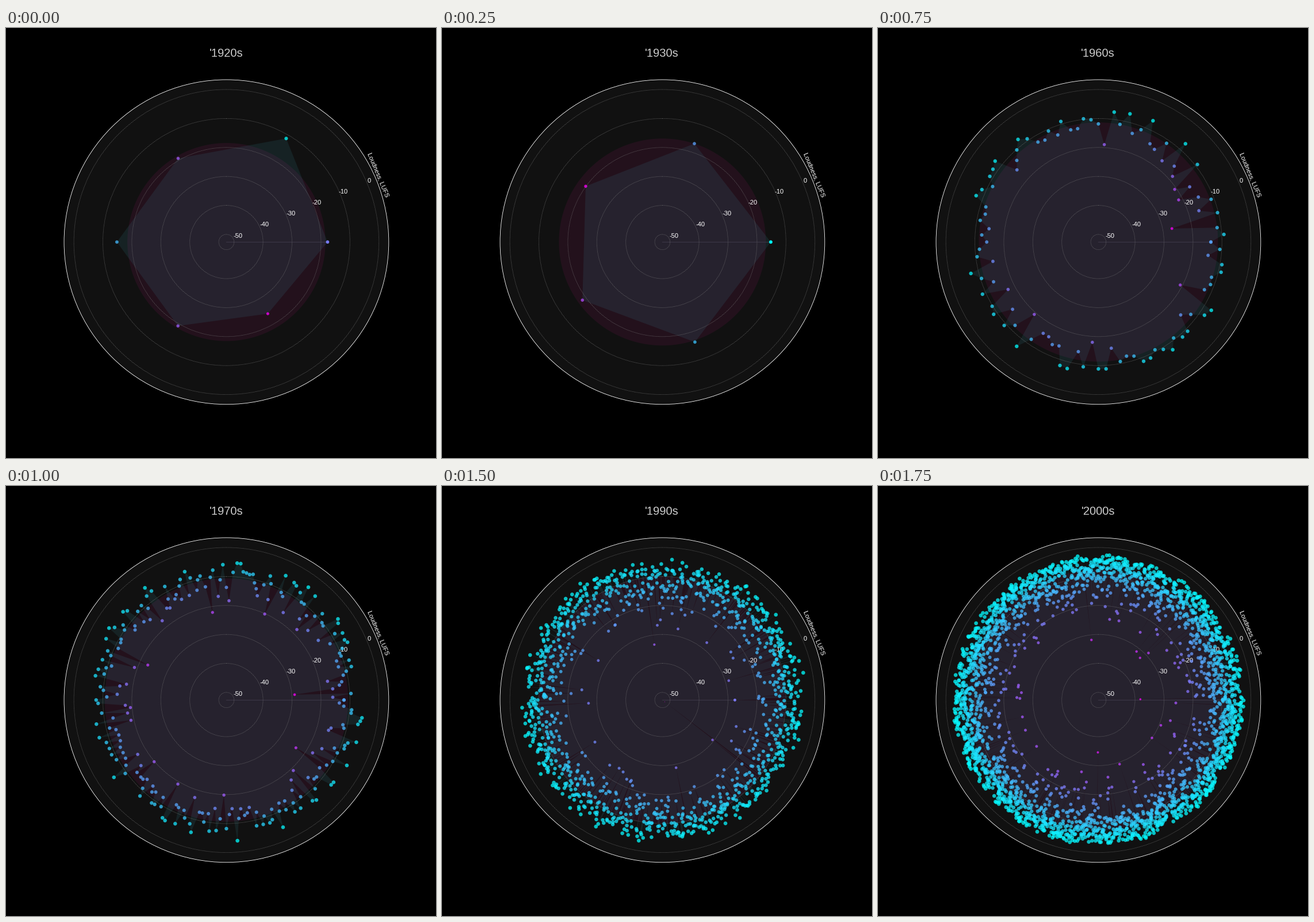
Recreate the animation shown at these times as a matplotlib script. Size 748x748 px, loop 2000 ms.

```python
import numpy as np
import matplotlib.pyplot as plt
from matplotlib.animation import FuncAnimation
from matplotlib.patches import Circle, Polygon

SIZE, DPI = 748, 100
CX, CY, RIM = 383.4, 372.3, 282.4
PX_PER_DB, FLOOR_DB = 5.04, -52.64
FONT = "Liberation Sans"


def tracks(count, loudest, shape, scale, quietest):
    """Radii crowded near the loud end, with a long quiet tail."""
    rng = np.random.default_rng(count)
    radii = np.maximum(loudest - rng.gamma(shape, scale, count), quietest)
    radii[radii.argmin()] = quietest
    return radii


DECADES = {
    "1920": np.array([176, 208, 168, 190.5, 168.5, 144]),
    "1930": np.array([188.5, 180, 165, 172, 183]),
    "1950": np.array([
        218, 146, 192, 198.5, 232, 182, 184, 209, 202, 191,
        197, 218, 146, 200, 214, 225, 199, 183, 214, 191,
        204, 190, 215, 185, 221.5, 215, 169, 232.5, 190, 179.5]),
    "1960": tracks(104, 240, 3, 12, 130),
    "1970": tracks(240, 248, 3, 13, 119),
    "1980": tracks(500, 256, 3, 15, 55),
    "1990": tracks(1150, 252, 3, 14, 5),
    "2000": tracks(2500, 254, 1.9, 17, 73),
}

fig = plt.figure(figsize=(SIZE / DPI, SIZE / DPI), dpi=DPI, facecolor="black")
ax = fig.add_axes([0, 0, 1, 1])
ax.set(xlim=(0, SIZE), ylim=(SIZE, 0))
ax.axis("off")


def ring(radius, **style):
    return ax.add_patch(Circle((CX, CY), radius, **style))


def label(x, y, text, size=8, color="white", **style):
    return ax.text(x, y, text, color=color, fontsize=size, family=FONT,
                   ha="center", **style)


ring(RIM, fc="#111111", ec="none", zorder=0)
middle = ring(1, fc="mediumvioletred", alpha=0.1, lw=0, zorder=1)
area = ax.add_patch(Polygon([(CX, CY)] * 3, fc="#43bbcf", alpha=0.1, lw=0, zorder=2))
seam, = ax.plot([], [], color="#3d3848", lw=0.72, zorder=3)

for db in range(-50, 1, 10):
    ring((db - FLOOR_DB) * PX_PER_DB, fill=False, ec="#7c7c7c", lw=0.6, ls=":", zorder=4)
    step = (db + 50) / 50
    label(404 + 228 * step, 364.5 - 95.2 * step, str(db), va="baseline", zorder=5)

dots = ax.scatter([], [], c=[], cmap="cool_r", alpha=0.75, linewidths=0, zorder=6)
ring(RIM, fill=False, ec="white", lw=0.6, zorder=7)
label(646.5, 256, "Loudness, LUFS", rotation=-67.5, rotation_mode="anchor",
      va="center", zorder=8)
title = label(382.7, 50, "", size=14.5, color="#cccccc", va="baseline")


def update(decade):
    radii = DECADES[decade]
    closed = np.append(radii, radii[0])
    theta = np.linspace(0, 2 * np.pi, len(closed))
    points = np.column_stack([CX + closed * np.cos(theta), CY - closed * np.sin(theta)])
    area.set_xy(points)
    middle.set_radius(np.median(radii))
    seam.set_data([CX, CX + radii[0]], [CY, CY])
    dots.set_offsets(points)
    dots.set_sizes(closed * 0.093)
    dots.set_array(closed)
    dots.set_clim(radii.min(), radii.max())
    title.set_text(f"'{decade}s")
    return area, middle, seam, dots, title


anim = FuncAnimation(fig, update, frames=list(DECADES), interval=250,
                     repeat=True, repeat_delay=0, blit=False)
plt.show()
```
